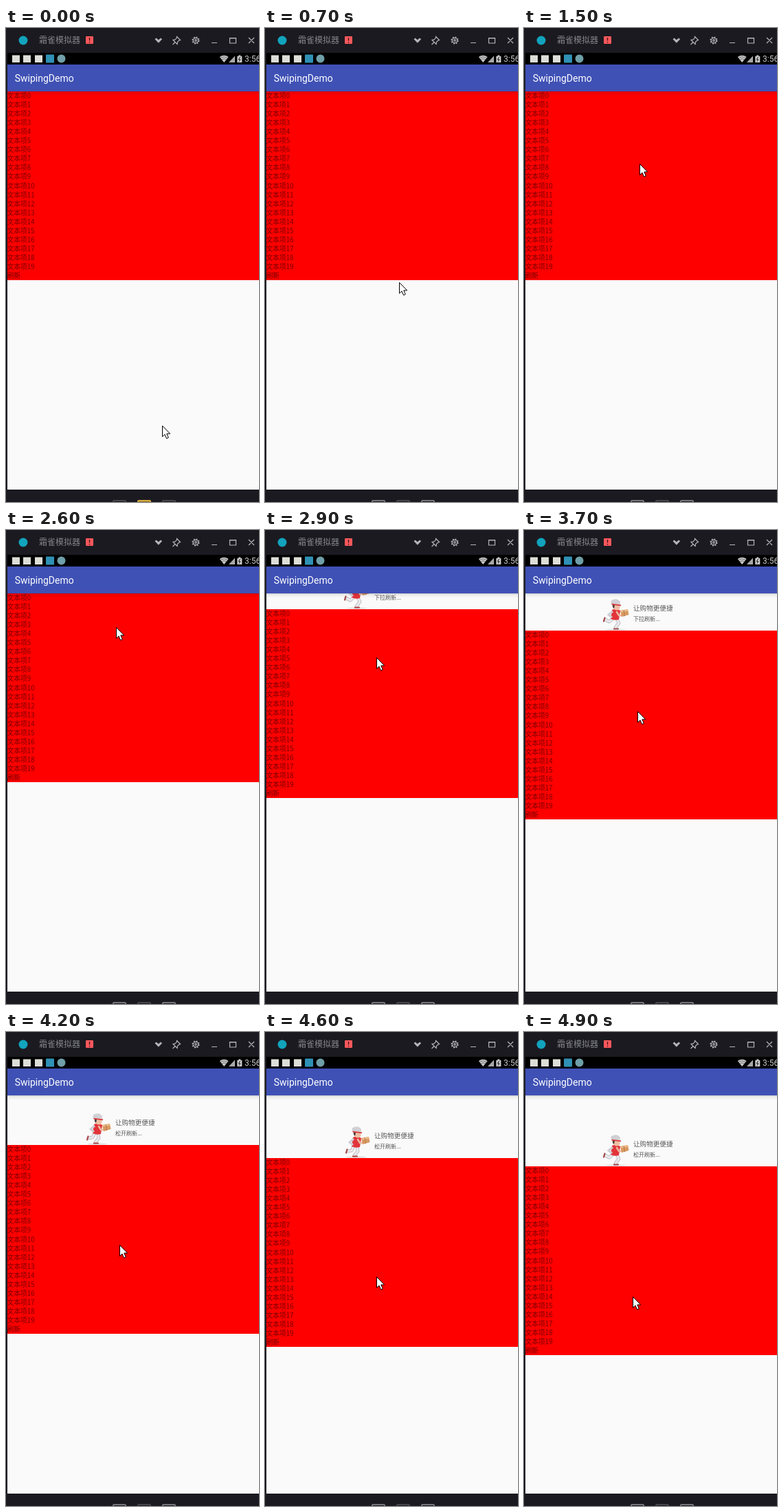
An HTML page for the animation above (5 s loop, 368 by 688 pixels).

```html
<!DOCTYPE html>
<html lang="zh-CN">
<head>
<meta charset="utf-8">
<title>Pull to refresh</title>
<style>
  html, body { margin: 0; width: 100%; height: 100%; overflow: hidden; background: #1b1a20; }
  svg { display: block; width: 368px; height: 688px; }
  text { font-family: "Noto Sans CJK SC", "Noto Sans CJK", "Noto Sans", sans-serif; }
  .roboto { font-family: Roboto, sans-serif; }
  .row { font-size: 9.7px; fill: #000; fill-opacity: .54; }
  .tool { fill: none; stroke: #b4b4ba; stroke-width: 1.2; }
  .dock { fill: none; stroke-width: 2; }
</style>
</head>
<body>
<svg viewBox="0 0 368 688">
  <defs>
    <clipPath id="screen"><rect x="2" y="92" width="366" height="578"/></clipPath>
    <linearGradient id="shade" x2="0" y2="1">
      <stop offset="0" stop-color="#000" stop-opacity=".18"/>
      <stop offset=".35" stop-color="#000" stop-opacity=".05"/>
      <stop offset="1" stop-color="#000" stop-opacity="0"/>
    </linearGradient>
  </defs>
  <rect width="368" height="688" fill="#1b1a20"/>

  <!-- window bar -->
  <circle cx="25" cy="18" r="6.5" fill="#12a3bd"/>
  <text x="48" y="22.3" font-size="12" fill="#85858d">霜雀模拟器</text>
  <rect x="116" y="12" width="11" height="11" rx="1" fill="#f9585c"/>
  <path d="M121.5 14v4.6M121.5 20v1.5" stroke="#3a1519" stroke-width="1.3"/>
  <path d="M216.5 16.300l2-1.800 3.300 2.700 3.300-2.700 2 1.800-5.300 5.500z" fill="#b4b4ba"/>
  <g class="tool">
    <path d="M248.5 12.5l5 5-1.7.6-2.3 2.3-.5 3-6-6 3-.5 2.3-2.3zM246 20.5l-3.5 3.5"/>
    <circle cx="276" cy="18" r="3.7"/>
    <circle cx="276" cy="18" r="4.8" stroke-width="1.6" stroke-dasharray="1.8 1.97"/>
    <circle cx="276" cy="18" r="1.3"/>
    <path d="M299 21.5h8M325.5 14.5h9v7.5h-9zM325.5 15h9M353 14l8 8M361 14l-8 8"/>
  </g>

  <!-- status bar -->
  <rect x="2" y="36" width="366" height="17"/>
  <g fill="#deded8">
    <rect x="9" y="39.5" width="11" height="10.5"/>
    <rect x="25" y="39.5" width="11" height="10.5"/>
    <rect x="42" y="39.5" width="11" height="10.5"/>
  </g>
  <rect x="58" y="38.5" width="12" height="12" rx="1" fill="#2f91b5"/>
  <circle cx="80.5" cy="44.5" r="6" fill="#6f9fa8"/>
  <g fill="#c9c9c9">
    <path d="M317.2 50l-6.4-8q6.4-4.6 12.8 0z"/>
    <path d="M324 50l9-9.5V50z" fill="#a8a8a8"/>
    <path d="M336.3 41h2v-1.4h3V41h2v9h-7z"/>
    <text class="roboto" x="347" y="49.2" font-size="12">3:56</text>
  </g>
  <path d="M312.5 43.2q4.7-2.8 9.4 0M314.3 45.6q2.9-1.8 5.8 0" fill="none" stroke="#333" stroke-width=".6"/>
  <path d="M340.6 42l-2.2 3.7h2.4l-1.8 3" fill="none" stroke="#111" stroke-width="1"/>

  <!-- app -->
  <rect x="2" y="53" width="366" height="39" fill="#3f51b5"/>
  <text class="roboto" x="12.7" y="78" font-size="14" fill="#fff">SwipingDemo</text>
  <rect x="2" y="92" width="366" height="578" fill="#fafafa"/>
  <g clip-path="url(#screen)">
    <g id="header">
      <ellipse cx="133" cy="-1.5" rx="15" ry="1" fill="#ddd"/>
      <g id="runner"></g>
      <g fill="#555">
        <text x="159" y="-29.3" font-size="9.6">让购物更便捷</text>
        <text id="hint" x="159" y="-14" font-size="8"></text>
      </g>
    </g>
    <g id="list"><rect x="2" width="366" height="274" fill="#f00"/></g>
    <rect x="2" y="92" width="366" height="7" fill="url(#shade)"/>
  </g>

  <!-- dock -->
  <g class="dock">
    <g id="sides">
      <rect x="156" y="686" width="18" height="14" rx="1"/>
      <rect x="228" y="686" width="18" height="14" rx="1"/>
    </g>
    <rect id="mid" x="192" y="686" width="18" height="14" rx="1"/>
  </g>
  <path id="cursor" d="M.5.5V16.2L4 12.9l2.5 5.9 2.8-1.2-2.5-5.7h4.9z" fill="#fff" stroke="#000" stroke-linejoin="round"/>
</svg>
<script>
const $ = id => document.getElementById(id);
const LOOP = 5000, STEP = 100, TOP = 92;

// time, x, y of the pointer tip
const path = [
  [0, 227, 577], [1300, 170, 204], [1400, 170, 204], [1500, 168, 197],
  [2000, 159, 127], [2200, 159, 127], [2600, 160, 141], [3300, 165, 243],
  [3400, 165, 252], [3700, 165, 263], [4200, 165, 309], [4600, 162, 355], [4900, 158, 384.3]
];

function pointer(t) {
  const i = path.findIndex(p => p[0] >= t);
  if (i < 1) return path[i < 0 ? path.length - 1 : 0].slice(1);
  const [a, b] = [path[i - 1], path[i]];
  let k = (t - a[0]) / (b[0] - a[0]);
  if (i === 1) k = k * k * (3 - 2 * k);
  return [1, 2].map(n => a[n] + (b[n] - a[n]) * k);
}

function label(y, s) {
  return `<text class="row" x="1.7" y="${y.toFixed(2)}">${s}</text>`;
}
let rows = "";
for (let i = 0; i < 21; i++) rows += label(10 + i * 13.05, i < 20 ? "文本项" + i : "刷新");
$("list").innerHTML += rows;

// courier with two strides
const strides = [
  { legs: "M129 -17L124 -13 118 -16M135 -17L138 -11 133 -4", shoes: "M117.5 -18.5l-1.500 5M131 -2.500h6" },
  { legs: "M129 -17L126 -11 120 -10M134 -17L135 -10 130 -4", shoes: "M119.5 -12.5l-1.500 5M128 -2.500h6" }
];
const courier = s => `
  <g fill="none" stroke-linecap="round" stroke-linejoin="round">
    <path d="${s.legs}" stroke="#b4b4ba" stroke-width="4.8"/>
    <path d="${s.legs}" stroke="#e9e9ed" stroke-width="3.2"/>
    <path d="${s.shoes}" stroke="#a8484a" stroke-width="2.2"/>
  </g>
  <path d="M128 -30Q134 -33 140 -29L138 -16Q132 -14 126 -17Z" fill="#e2343b"/>
  <path d="M129 -28L123 -23 128 -19" fill="none" stroke="#cfcfd4" stroke-width="3"/>
  <ellipse cx="135" cy="-34" rx="4.7" ry="4.6" fill="#eebfa4"/>
  <path d="M129 -38Q128 -34 131 -32L132 -37Z" fill="#4a3a3a"/>
  <path d="M127 -39Q125 -44 130 -45 135 -47 138 -44 141 -42 139.5 -38Z" fill="#d0d0d5"/>
  <path d="M127.5 -38.3L141 -36.6" stroke="#d8373c" stroke-width="1.8"/>
  <path d="M135 -27L138 -22 146 -22" fill="none" stroke="#eab99e" stroke-width="2.6" stroke-linecap="round"/>
  <path d="M140 -29L151 -31 152.5 -23 142 -20Z" fill="#d89a62"/>
  <path d="M140 -29L151 -31 151.4 -28.5 140.7 -26.5Z" fill="#ebbd8c"/>
  <path d="M145 -30l1.5 9" stroke="#b9784a"/>`;
const poses = strides.map(courier);
let pose = -1;

function draw(now) {
  const t = Math.floor((now % LOOP) / STEP) * STEP;
  const [x, y] = pointer(t);
  const pull = t > 2600 ? Math.max(0, Math.round((y - 128) * 0.4)) : 0;
  const move = `translate(0 ${TOP + pull})`;
  $("cursor").setAttribute("transform", `translate(${Math.round(x)} ${Math.round(y)})`);
  $("list").setAttribute("transform", move);
  $("header").setAttribute("transform", move);
  $("header").setAttribute("visibility", pull ? "visible" : "hidden");
  $("hint").textContent = (pull < 62 ? "下拉" : "松开") + "刷新...";
  const next = t / STEP % 2 ? 0 : 1;
  if (next !== pose) $("runner").innerHTML = poses[pose = next];
  const lit = t < STEP;
  $("sides").setAttribute("stroke", lit ? "#47474b" : "#77777b");
  $("mid").setAttribute("stroke", lit ? "#d9ad3c" : "#47474b");
  $("mid").setAttribute("fill", lit ? "#8a7238" : "none");
}

const start = performance.now();
function tick() {
  draw(performance.now() - start);
  requestAnimationFrame(tick);
}
tick();
</script>
</body>
</html>
```
